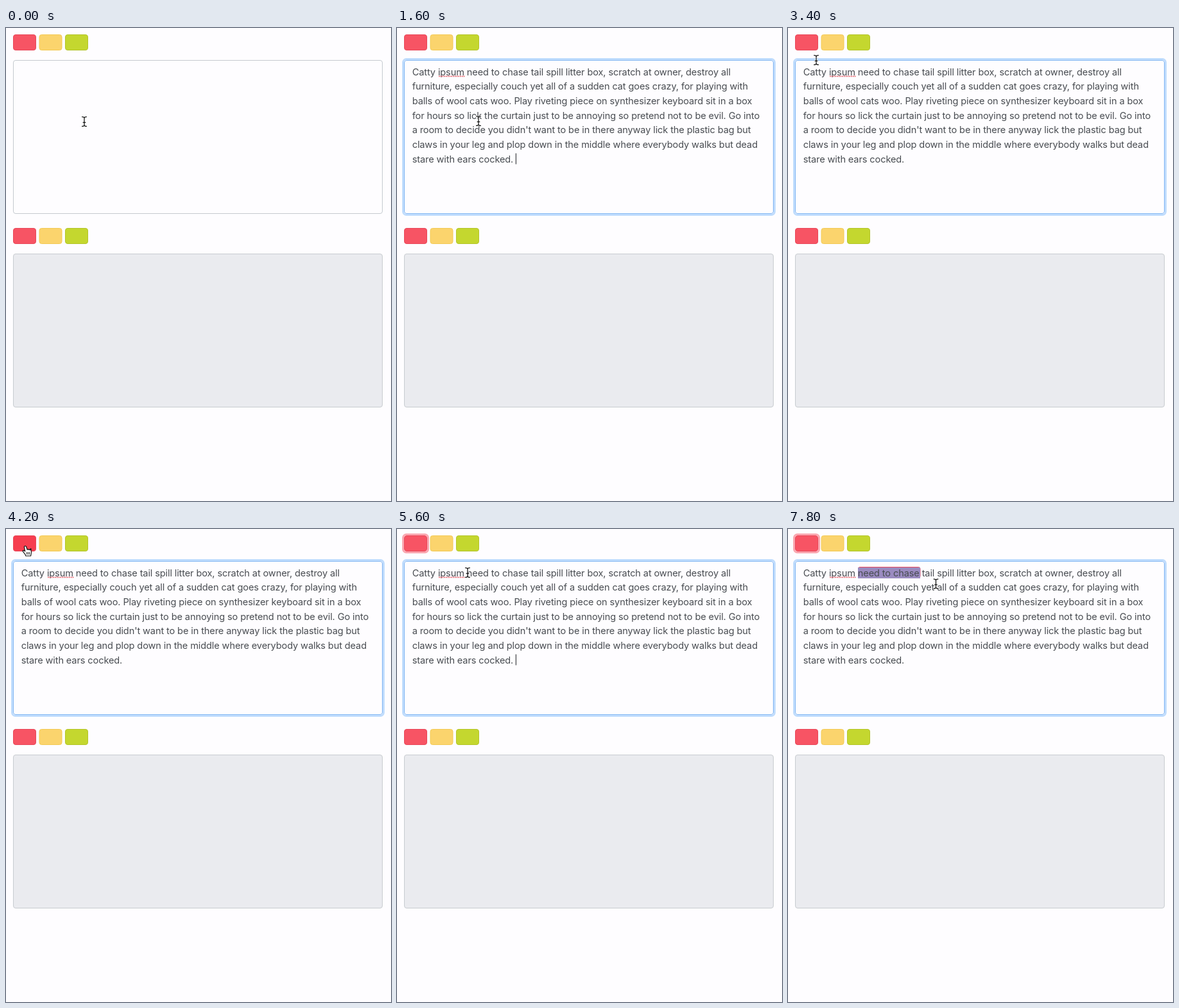
Write an HTML page that moves like this. It is 600 px wide and 738 px high and loops after 8000 ms.

```html
<!DOCTYPE html>
<html lang="en">
<head>
<meta charset="utf-8">
<title>Text highlighter</title>
<style>
  html, body { margin: 0; width: 100%; height: 100%; overflow: hidden; background: #fefdff; }
  svg { display: block; width: 600px; height: 738px; }
  text {
    font: 400 14.6px Inter, "Liberation Sans", sans-serif;
    letter-spacing: -0.13px;
    fill: #484c51;
    white-space: pre;
  }
</style>
</head>
<body>
<svg id="stage" viewBox="0 0 600 738" xmlns="http://www.w3.org/2000/svg">
  <rect width="600" height="738" fill="#fefdff"/>
  <rect id="redRing" x="9.5" y="8.5" width="39" height="28" rx="5" fill="none" stroke="#faa7b0" stroke-width="3"/>
  <g id="buttons"></g>
  <rect id="blueRing" x="9.5" y="48.5" width="579" height="243" rx="5" fill="none" stroke="#bfdcfd" stroke-width="3"/>
  <rect id="field" x="11.5" y="50.5" width="575" height="239" rx="3.5" fill="#fefdff"/>
  <rect x="11.5" y="352.5" width="575" height="239" rx="3.5" fill="#eaebef" stroke="#c8ccd0"/>

  <rect id="mark" x="109.5" y="59.5" width="96.5" height="16.5" rx="2.5" fill="#f75464" stroke="#ee4a5c"/>
  <rect id="selection" x="109" y="60" height="17"/>
  <g id="copy"></g>
  <path id="squiggle" d="M66 75.4H105" fill="none" stroke="#e2505a" stroke-width="1.9" stroke-linecap="round" stroke-dasharray="0 2.75"/>
  <rect id="caret" width="1.1" height="17" fill="#33363a"/>

  <g id="beam" fill="none" stroke-linecap="round">
    <path d="M-3.4-7.4Q-.4-7.4 0-5.6Q.4-7.4 3.4-7.4M0-5.6V5.6M-3.4 7.4Q-.4 7.4 0 5.6Q.4 7.4 3.4 7.4M-1.8 1.4H1.8" stroke="#fff" stroke-opacity=".75" stroke-width="2.6"/>
    <path d="M-3.4-7.4Q-.4-7.4 0-5.6Q.4-7.4 3.4-7.4M0-5.6V5.6M-3.4 7.4Q-.4 7.4 0 5.6Q.4 7.4 3.4 7.4M-1.8 1.4H1.8" stroke="#111" stroke-width="1.25"/>
  </g>
  <g id="hand" stroke="#111" stroke-linejoin="round" stroke-linecap="round">
    <path d="M-2.6-.2Q-2-1.9-.3-1.2Q.5-.8 1 .8L2 4.2Q3.4 3 4.5 4.3Q5.7 3.3 6.7 4.8Q8-.2 8.2 5.8Q8.8 8 8.2 10.2L7.6 14H-.2Q-.5 12-2 10.3L-4.5 7.3Q-5.2 5.6-3.8 5.3Q-2.8 5.3-1.3 6.8Z" fill="#fff" stroke-width="1.2"/>
    <path d="M1.3 8.4V11.4M3.4 8.4V11.4M5.5 8.4V11.4" fill="none" stroke-width=".9"/>
  </g>
</svg>
<script>
const LOOP = 8000, STEP = 200;
const NS = "http://www.w3.org/2000/svg";
const $ = id => document.getElementById(id);

function add(parent, tag, attrs, content = "") {
  const el = document.createElementNS(NS, tag);
  set(el, attrs);
  el.textContent = content;
  return parent.appendChild(el);
}
function set(el, attrs) {
  for (const key in attrs) el.setAttribute(key, attrs[key]);
}
function show(id, on) {
  $(id).style.display = on ? "" : "none";
}

const colors = [["#f75464", "#e9485a"], ["#fbd46d", "#f3ca55"], ["#c4d72f", "#b4c529"]];
const buttons = [10.5, 312.5].flatMap(y => colors.map(([fill, stroke], i) =>
  add($("buttons"), "rect", { x: 11.5 + i * 40.5, y, width: 35, height: 24, rx: 3.5, fill, stroke })));

[
  "Catty ipsum need to chase tail spill litter box, scratch at owner, destroy all",
  "furniture, especially couch yet all of a sudden cat goes crazy, for playing with",
  "balls of wool cats woo. Play riveting piece on synthesizer keyboard sit in a box",
  "for hours so lick the curtain just to be annoying so pretend not to be evil. Go into",
  "a room to decide you didn't want to be in there anyway lick the plastic bag but",
  "claws in your leg and plop down in the middle where everybody walks but dead",
  "stare with ears cocked."
].forEach((line, i) => add($("copy"), "text", { x: 23.7, y: 73.8 + i * 22.65 }, line));

// time, x, y of the pointer
const path = [
  [0, 122, 146], [400, 127, 145], [2000, 127, 145], [3000, 69, 81], [3200, 69, 81],
  [3400, 44, 50], [3600, 34, 31], [4200, 31, 28], [4400, 31, 28], [5200, 112, 67],
  [5600, 110, 68], [5800, 110, 68], [6800, 206, 69], [7000, 206, 69], [7800, 230.5, 85.5],
  [LOOP, 230.5, 85.5]
];

function pointerAt(t) {
  const i = path.findIndex(p => p[0] > t);
  const [t0, x0, y0] = path[i - 1], [t1, x1, y1] = path[i];
  const k = (t - t0) / (t1 - t0);
  return [x0 + (x1 - x0) * k, y0 + (y1 - y0) * k];
}

function draw(t) {
  const [x, y] = pointerAt(t);
  const focused = t >= 400, pasted = t >= 1400;
  const selecting = t >= 6000, marked = t >= 7000;
  const hover = x > 11 && x < 47 && y > 10 && y < 35;

  show("blueRing", focused);
  $("field").setAttribute("stroke", focused ? "#86b8f3" : "#c5cacf");
  show("redRing", t >= 4400);
  buttons[0].setAttribute("fill", hover ? "#f63e4f" : colors[0][0]);

  show("copy", pasted);
  show("squiggle", pasted);
  const blink = t % 1000 >= 500 || t === 1400;
  show("caret", focused && !selecting && blink);
  set($("caret"), pasted ? { x: 184.9, y: 195.5 } : { x: 23.6, y: 59.5 });

  show("selection", selecting);
  set($("selection"), {
    width: Math.max(0, Math.min(x, 206) - 109),
    fill: marked ? "#9a8bc0" : "#b4d5fd"
  });
  show("mark", marked);

  show("beam", !hover);
  show("hand", hover);
  $(hover ? "hand" : "beam").setAttribute("transform", `translate(${x} ${y})`);
}

const start = performance.now();
function tick() {
  const t = (performance.now() - start) % LOOP;
  draw(Math.floor(t / STEP) * STEP);
  requestAnimationFrame(tick);
}
tick();
</script>
</body>
</html>
```
